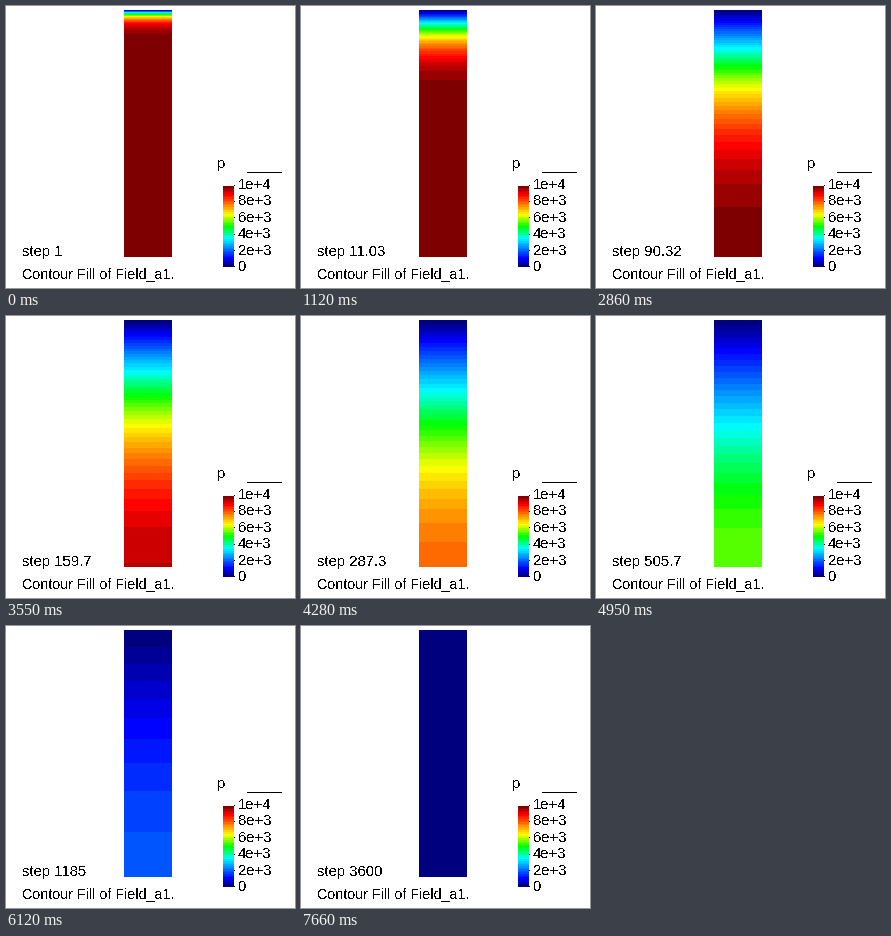
A matplotlib script that plays this animation: 289x282 px, repeating every 8190 ms.

```python
import numpy as np
import matplotlib.pyplot as plt
from matplotlib.animation import FuncAnimation
from matplotlib.patches import Rectangle

W, H, DPI = 289, 282, 64
LOOP, TICK = 8190, 30
LEFT, RIGHT, TOP, BOTTOM = 118, 166, 4, 251
BANDS = 50
LAST, END_STEP = 106, 3600
LOAD = 1.0045    # start pressure relative to the top of the scale
DECAY = 0.00166  # decay rate of the slowest mode


def rainbow(v):
    """Dark blue, blue, cyan, green, yellow, red, dark red; mirrored about 0.5."""
    def channel(s):
        rise = np.interp(s, [0.5, 0.65], [0, 1])
        return np.where(s > 0.9, 1 - 5 * (s - 0.9), rise)
    green = np.interp(np.abs(v - 0.5), [0.15, 0.4], [1, 0])
    return np.stack([channel(v), green, channel(1 - v)], axis=-1)


palette = rainbow(np.linspace(0, 1, BANDS))

# Consolidation of a column drained at the top: implicit time steps, each 5% longer
steps = 1.05 ** np.arange(LAST + 1)
times = np.minimum(np.cumsum(steps), END_STEP)
steps = np.diff(times, prepend=0)
modes = np.arange(1, 600, 2)
depth = (np.arange(BOTTOM - TOP) + 0.5) / (BOTTOM - TOP)
shapes = LOAD * np.sin(np.pi / 2 * np.outer(depth, modes)) * 4 / (np.pi * modes)
damping = np.cumprod(1 / (1 + DECAY * np.outer(steps, modes ** 2)), axis=0)


def column(n):
    p = shapes @ damping[n]
    band = np.clip((p * BANDS).astype(int), 0, BANDS - 1)
    return palette[band][:, None, :]


def step_at(ms):
    """Hold the first step, then run at a nearly even pace to the last."""
    return int(np.interp(ms, [0, 660, 1120, 4950, 7660], [0, 1, 8, 66, LAST]))


fig = plt.figure(figsize=(W / DPI, H / DPI), dpi=DPI, facecolor="white")
ax = fig.add_axes([0, 0, 1, 1])


def label(x, y, s, px=14.9):
    return ax.text(x, y, s, fontsize=px * 72 / DPI, family="Liberation Sans",
                   color="black", ha="left", va="baseline", antialiased=False)


def block(x0, x1, y0, y1, pixels):
    return ax.imshow(pixels, extent=(x0, x1, y1, y0),
                     interpolation="nearest", aspect="auto")


def dash(x, y, width):
    ax.add_patch(Rectangle((x, y), width, 1, lw=0, color="black",
                           antialiased=False))


bar = block(LEFT, RIGHT, TOP, BOTTOM, column(0))
block(217, 228, 180, 261, palette[::-1][:, None, :])

for i in range(6):
    value = 10 - 2 * i
    dash(228, round(179 + 16.2 * i), 1)
    label(232, round(183 + 16.4 * i), f"{value * 1000:.0e}".replace("+0", "+")
          if value else "0")

label(211.5, 162, "p")
dash(241, 166, 35)
label(15.5, 272, "Contour Fill of Field_a1.", 14.2)
counter = label(15.5, 250, "step 1")

ax.set_xlim(0, W)
ax.set_ylim(H, 0)
ax.axis("off")


def update(i):
    n = step_at((i + 0.5) * TICK)
    bar.set_data(column(n))
    counter.set_text(f"step {times[n]:.4g}")
    return bar, counter


anim = FuncAnimation(fig, update, frames=LOOP // TICK, interval=TICK,
                     repeat=True, repeat_delay=0, blit=False)
plt.show()
```
